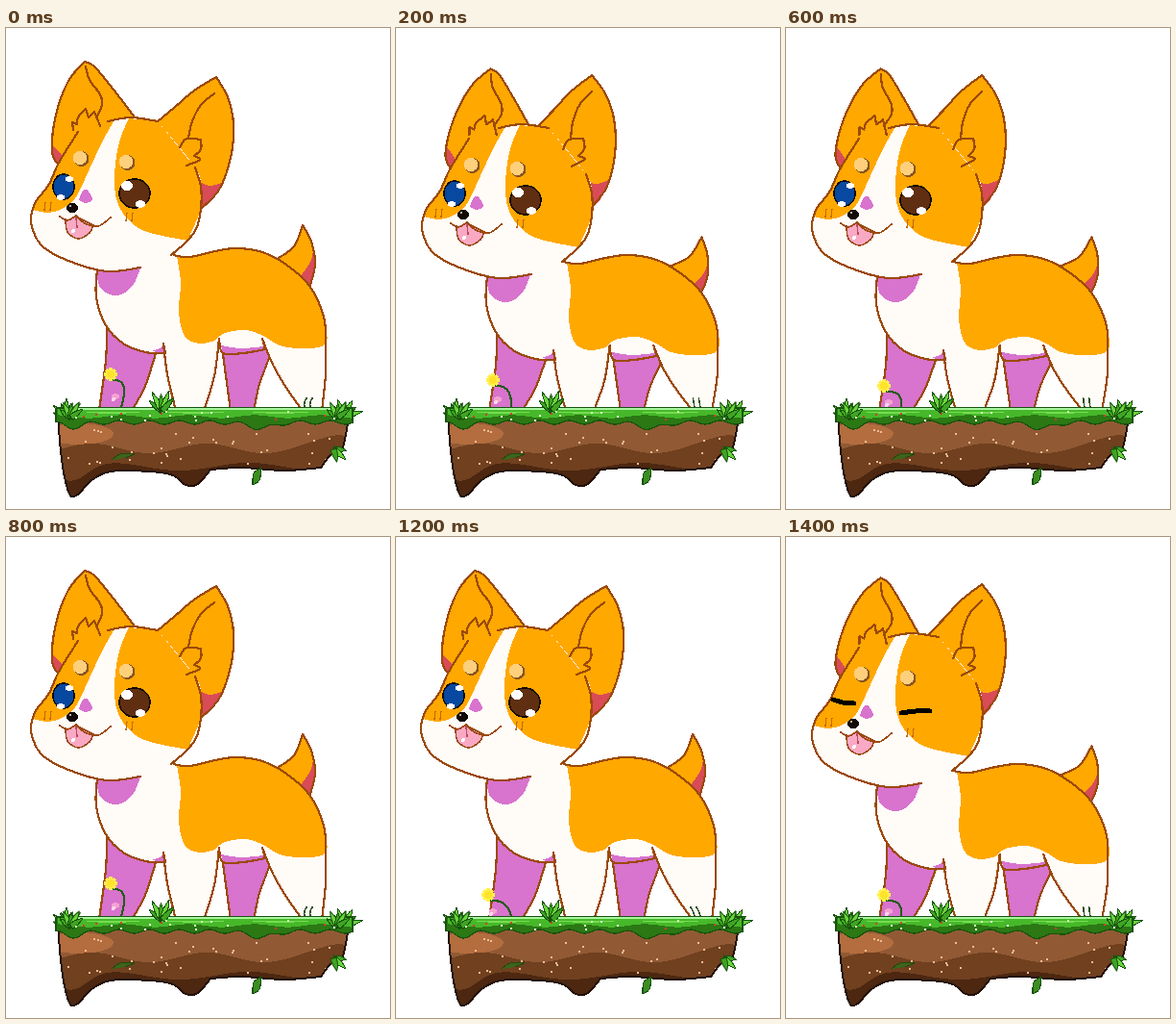
Animation, 400 px wide and 500 px high, one loop 1.6 s. Source, as an HTML page:

```html
<!DOCTYPE html>
<html lang="en">
<head>
<meta charset="utf-8">
<title>Puppy on a floating island</title>
<style>
html, body { margin: 0; width: 100%; height: 100%; overflow: hidden; background: #fff; }
svg { display: block; width: 400px; height: 500px; shape-rendering: crispEdges; }
</style>
</head>
<body>
<svg id="stage" viewBox="0 0 400 500" fill="none" stroke-linecap="round" stroke-linejoin="round"></svg>
<script>
const NS = "http://www.w3.org/2000/svg";
const stage = document.getElementById("stage");
const STEP = 200, STEPS = 8, GROUND = 394;
const LINE = "#9c490b", ORANGE = "#ffa800", WHITE = "#fffcf8";
const PURPLE = "#d873ce", RED = "#d94c57", INK = "#120a06";
const DARK_GREEN = "#17530d";

function add(parent, tag, attrs = {}) {
  const el = document.createElementNS(NS, tag);
  for (const k in attrs) el.setAttribute(k, attrs[k]);
  parent.appendChild(el);
  return el;
}

// Smooth line through the points; "|" marks a sharp corner.
function curve(text, warp = p => p) {
  let d = "", last = null;
  for (const part of text.split("|")) {
    const pts = part.trim().split(/\s+/).map(p => warp(p.split(",").map(Number)));
    if (last) pts.unshift(last);
    else d = "M" + pts[0];
    for (let i = 0; i < pts.length - 1; i++) {
      const a = pts[i], b = pts[i + 1];
      const before = pts[i - 1] || a, after = pts[i + 2] || b;
      const c1 = a.map((v, k) => v + (b[k] - before[k]) / 6);
      const c2 = b.map((v, k) => v - (after[k] - a[k]) / 6);
      d += `C${c1} ${c2} ${b}`;
    }
    last = pts[pts.length - 1];
  }
  return d;
}

const path = (g, d, fill, stroke = "none", width = 2.2) =>
  add(g, "path", { d, fill, stroke, "stroke-width": width });
const shape = (g, text, fill, stroke, width) => path(g, curve(text), fill, stroke, width);
const line = (g, text, stroke = LINE, width) => shape(g, text, "none", stroke, width);
const oval = (g, cx, cy, rx, ry, fill, stroke = "none", width = 1.5) =>
  add(g, "ellipse", { cx, cy, rx, ry, fill, stroke, "stroke-width": width });
const group = (parent, transform = "") => add(parent, "g", { transform });
const dot = (g, x, y, fill) =>
  add(g, "rect", { x: Math.round(x), y: Math.round(y), width: 1.6, height: 1.6, fill });

let seed = 29;
function random() {
  seed = (seed * 16807) % 2147483647;
  return seed / 2147483647;
}

// The feet stay planted while everything above the knees sinks by 7 px.
function drawBody(g, low) {
  const warp = ([x, y]) => {
    const bend = low * Math.min(1, Math.max(0, (GROUND - y) / 56));
    return [x + bend * Math.max(0, x - 180) * .015, y + 7 * bend];
  };
  const part = (text, fill, stroke) => path(g, curve(text, warp), fill, stroke);
  const back = "333,328 331,300 316,268 292,246 267,233 240,229 218,232 192,238 178,237";
  const body = "95,250 94,280 104,309 122,328 145,337 166,338 | 164,328 | 168,360 177,398"
    + "| 206,398 | 217,362 222,323 | 226,338 247,338 270,334 | 267,323 | 278,350 292,374 309,398"
    + "| 329,398 | 333,360 " + back + "| 150,225";

  part("105,308 104,345 97,398 | 131,398 | 145,372 157,335", PURPLE, LINE);
  part("225,332 234,398 | 258,398 | 264,370 275,338 268,325", PURPLE, LINE);

  const tail = group(g, low ? "translate(0 10) rotate(10 300 260)" : "");
  const tailShape = "281,241 300,227 309,205 | 318,222 322,245 316,271";
  shape(tail, tailShape, ORANGE);
  shape(tail, "320,231 317,243 307,258 | 316,271 | 322,250 320,231", RED);
  line(tail, tailShape);

  part(body, WHITE);
  part("178,237 182,265 180,295 186,320 201,328 218,325 | 228,317 250,314 268,320 285,330 310,333 " + back, ORANGE);
  part("224,330 245,333 268,331 | 270,334 247,338 226,338", PURPLE);
  part("151,336 160,333 165,328 | 166,338", PURPLE);
  part("95,253 97,268 108,277 120,277 132,268 140,250 | 115,245", PURPLE);
  part(body, "none", LINE);
}

function drawEar(g, outline, shade) {
  shape(g, outline, ORANGE);
  shape(g, shade, RED);
  line(g, outline);
}

function drawEyes(g) {
  oval(g, 60, 165, 11, 13, "#0748a0", INK);
  oval(g, 66, 157, 4, 3, "#fff");
  oval(g, 57, 176, 4, 3, "#fff");
  oval(g, 134, 172, 16, 15, "#602f12", INK);
  oval(g, 126, 164, 6, 5, "#fff");
  oval(g, 140, 183, 5, 4, "#fff");
}

function drawFace(g) {
  for (const [x, y] of [[77, 135], [125, 139]]) {
    oval(g, x + 1.5, y + 1, 8, 8, "#8a5423");
    oval(g, x, y, 7.5, 7, "#ffd07c");
  }
  shape(g, "76,179 79,171 84,168 90,178 83,182 76,179", PURPLE);
  shape(g, "62,199 64,212 75,219 87,213 91,205 | 73,196", "#f9a9c3", LINE, 1.5);
  line(g, "73,197 74,207", "#b84b60", 1.5);
  oval(g, 70, 211, 2, 2, "#fff");
  line(g, "56,196 64,200 73,195 | 82,203 96,206 109,197", LINE, 1.6);
  oval(g, 69, 187, 6, 5, INK);
  oval(g, 67, 185, 1.5, 1, "#b9a9a4");
  for (const [x, y] of [[41, 181], [126, 192]])
    for (const dx of [0, 6]) line(g, `${x + dx},${y} ${x + dx - 1},${y + 9}`, "#c56808", 1.3);
}

function drawDog(low) {
  const g = group(stage);
  drawBody(g, low);

  const leftTurn = low ? "translate(1 2) rotate(8.3 52 145)" : "";
  const rightTurn = low ? "translate(0 -1) rotate(-6.2 203 188)" : "";
  drawEar(group(g, leftTurn), "55,143 48,128 52,90 65,55 82,35 | 92,40 112,64 135,94",
    "49,122 59,133 | 55,143 49,136");
  drawEar(group(g, rightTurn), "158,97 175,83 196,65 219,51 | 231,72 237,100 234,135 222,168 203,188",
    "202,160 212,164 225,161 | 214,180 203,188");

  const head = group(g, low ? "translate(1 7)" : "");
  const cheek = "32,179 45,162 55,140 75,108";
  const jaw = "140,249 105,253 65,242 37,226 26,203 28,188 " + cheek;
  const crown = "106,97 130,93 158,97";
  const nape = "197,145 203,165 203,188 198,209 187,223 172,236";
  shape(head, `${jaw} | ${crown} | ${nape}`, WHITE);
  shape(head, `113,96 102,115 90,140 80,162 | 72,177 60,187 45,192 28,189 | ${cheek} | 90,100`, ORANGE);
  shape(head, "128,94 119,115 114,140 113,165 117,184 128,200 147,212 189,221 | 203,188 203,165 197,145 | 158,97", ORANGE);
  for (const edge of [jaw, crown, nape]) line(head, edge);

  const left = group(g, leftTurn), right = group(g, rightTurn);
  line(left, "83,40 87,54 98,69 100,80 94,93");
  line(left, "70,106 69,98 | 74,100 | 75,93 83,84 | 86,93 | 92,87 | 95,94 98,102");
  line(right, "217,68 203,80 194,97 190,114");
  line(right, "181,124 188,115 203,116 | 203,126 196,133 | 202,137 188,143");

  drawFace(head);
  const eyes = group(head);
  drawEyes(eyes);
  return { g, head, eyes };
}

// Filled strip between two height functions of x.
function strip(g, x0, x1, top, bottom, fill, stroke, width) {
  const upper = [], lower = [];
  for (let x = x0; x <= x1; x += 3) {
    upper.push([x, top(x)]);
    lower.unshift([x, bottom(x)]);
  }
  path(g, "M" + upper.concat(lower).join("L") + "Z", fill, stroke, width);
}

const bump = (x, center, width) => Math.exp(-(((x - center) / width) ** 2));

// A fan of pointed blades around an angle (degrees, 0 is up).
function tuft(g, x, y, count, spread, size, lean = 0) {
  for (let i = 0; i < count; i++) {
    const turn = lean + spread * (i / (count - 1) - .5);
    const tall = size * (i % 2 ? 1 : .8);
    const blade = group(g, `translate(${x} ${y}) rotate(${turn})`);
    path(blade, `M-3 0Q-4 ${-tall * .6} 0 ${-tall}Q3 ${-tall * .5} 3 0Z`,
      i % 2 ? "#6ad43c" : "#3fa423", DARK_GREEN, 1);
  }
}

function drawIsland() {
  const g = group(stage);
  const soil = "54,403 57,440 61,467 67,486 76,484 88,471 109,461 150,461 174,465 187,475 200,474 213,459"
    + "| 245,457 290,460 328,457 | 338,444 350,438 357,406";
  add(add(g, "clipPath", { id: "soil" }), "path", { d: curve(soil) });
  const earth = add(g, "g", { "clip-path": "url(#soil)" });
  const floor = () => 495;
  strip(earth, 50, 362, () => 400, floor, "#915a34");
  oval(earth, 76, 422, 36, 11, "#b36d3e");
  strip(earth, 50, 362, x => 437 + 5 * Math.sin(x / 19) - 12 * bump(x, 356, 30), floor, "#70401f");
  strip(earth, 50, 362, x => 456 + 4 * Math.sin(x / 23) + 14 * bump(x, 70, 22) - 16 * bump(x, 352, 20), floor, "#4d2710");
  for (let i = 0; i < 34; i++) dot(earth, 64 + random() * 280, 417 + random() * 36, "#f0bd94");
  shape(g, soil, "none", "#241109", 2);

  for (const [x, y, lean] of [[58, 404, -45], [347, 404, 40]]) tuft(g, x + 6, y, 6, 120, 19, lean / 3);
  const edge = x => 410 + 2 * Math.sin(x / 5) + 5 * bump(x, 70, 14) + 6 * bump(x, 266, 18);
  strip(g, 52, 361, () => 395, edge, "#2b7814", DARK_GREEN, 1.3);
  strip(g, 54, 360, () => 396, x => 404 + 1.6 * Math.sin(x / 11), "#46b829");
  strip(g, 70, 340, () => 395, () => 397, "#a9f6a1");
  strip(g, 84, 330, () => 399, x => 400 + Math.sin(x / 14), "#75dd51");
  tuft(g, 163, 398, 5, 95, 22, -5);
  tuft(g, 68, 405, 5, 110, 18);
  tuft(g, 346, 405, 5, 110, 18);
  for (let i = 0; i < 20; i++)
    dot(g, 70 + random() * 275, 398 + random() * 9, ["#d4ffb5", "#fff", "#e23b33"][i % 3]);

  shape(g, "266,457 258,463 257,475 | 264,470 266,457", "#3c8e20", DARK_GREEN, 1.2);
  tuft(g, 341, 438, 3, 70, 17, 130);
  shape(g, "110,449 119,443 134,443 | 124,447", "#3d641a", "#27480f", 1);
}

// Stem, bud and the grass at the right all follow the flower's head.
function drawFlower(x, y) {
  const g = group(stage);
  const sway = (x - 109) / 13;
  path(g, `M${x + 3} ${y + 6}Q${x + 20} ${y + 5} 120 ${GROUND}`, "none", "#235d18", 2.2);
  const budX = x + 5, budY = 383 + (y - 360) / 2;
  oval(g, budX, budY, 4, 3, "#f2a2cf");
  oval(g, budX - 2, budY + 3, 2, 2, "#ffd5ed");
  for (let i = 0; i < 8; i++) {
    const a = i * Math.PI / 4;
    oval(g, x + 5 * Math.cos(a), y + 5 * Math.sin(a), 2.2, 2.2, "#fff04c");
  }
  oval(g, x, y, 4, 4, "#ffe32a");
  for (const root of [311, 317])
    path(g, `M${root} ${GROUND}Q${root - 1} 389 ${root + 2 + 6 * sway} 385`, "none", "#2b4f18", 1.5);
  return g;
}

const poses = [drawDog(0), drawDog(1)];
const lids = group(poses[1].head);
line(lids, "48,162 58,165 70,166", "#000", 5);
line(lids, "119,176 134,174 149,174", "#000", 5);
drawIsland();
const flowers = [[109, 360], [101, 366], [96, 372], [102, 372]].map(p => drawFlower(...p));

const show = (el, on) => el.setAttribute("display", on ? "inline" : "none");
const start = performance.now();

function update(now) {
  const step = Math.floor(Math.max(0, now - start) / STEP) % STEPS;
  const blink = step === STEPS - 1;
  poses.forEach((pose, i) => show(pose.g, step % 2 === i));
  flowers.forEach((flower, i) => show(flower, step % 4 === i));
  show(poses[1].eyes, !blink);
  show(lids, blink);
  requestAnimationFrame(update);
}
update(start);
</script>
</body>
</html>
```
